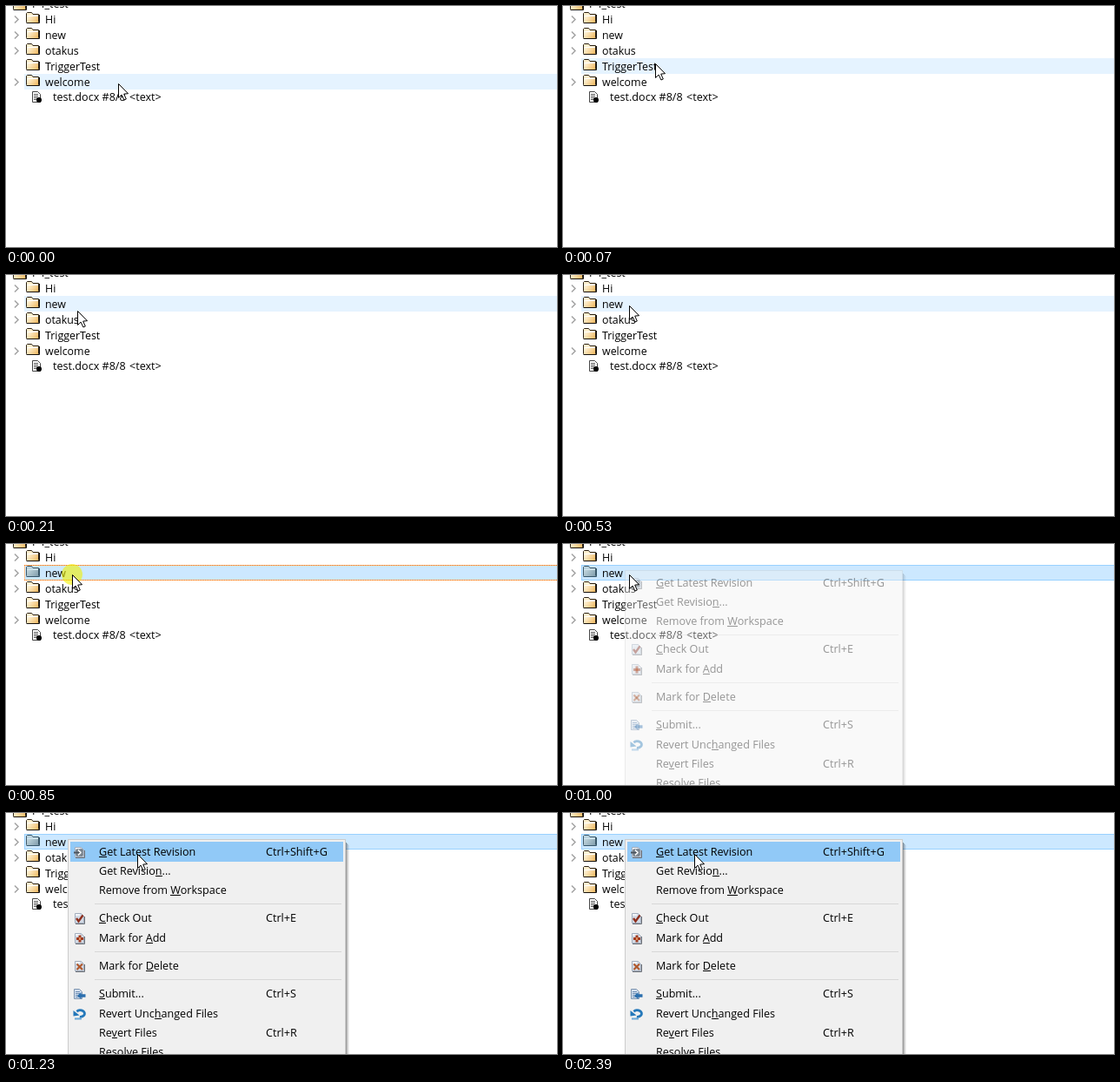
Animation of 634 by 277 pixels, one loop 2.56 s. Source, as an HTML page with a canvas:

```html
<!DOCTYPE html>
<html lang="en">
<head>
<meta charset="utf-8">
<title>Tree context menu</title>
<style>
  html, body { margin: 0; width: 100%; height: 100%; overflow: hidden; background: #fff; }
  canvas { display: block; }
</style>
</head>
<body>
<canvas id="stage" width="634" height="277"></canvas>
<script>
const W = 634, H = 277, LOOP = 2560;
const ctx = document.getElementById('stage').getContext('2d');
const FAMILY = '"Open Sans", "Noto Sans", sans-serif';
const MENU_X = 71, MENU_Y = 30, MENU_W = 320;

// Each pose holds until the next one starts.
const poses = [
  { t: 0, x: 129, y: 89, hover: 4 },
  { t: 70, x: 106, y: 66, hover: 3 },
  { t: 130, x: 87, y: 47, hover: 2 },
  { t: 210, x: 82, y: 41, hover: 1 },
  { t: 380, x: 78, y: 37, hover: 1 },
  { t: 460, x: 76, y: 35, hover: 1 },
  { t: 540, x: 76, y: 35, selected: 1, focus: 1, click: 1 },
  { t: 620, x: 76, y: 35, selected: 1, focus: 1 },
  { t: 850, x: 76, y: 35, selected: 1, focus: 1, click: 1 },
  { t: 1000, x: 76, y: 35, selected: 1, menu: .4 },
  { t: 1080, x: 76, y: 35, selected: 1, menu: .85 },
  { t: 1150, x: 112, y: 41, selected: 1, menu: 1, active: 1 },
  { t: 1230, x: 151, y: 47, selected: 1, menu: 1, active: 1 }
];

const folders = [
  { name: 'Hi', open: 1 }, { name: 'new', open: 1 }, { name: 'otakus', open: 1 },
  { name: 'TriggerTest' }, { name: 'welcome', open: 1 }
];

// "&" marks the underlined access key.
const items = [
  { y: 45, label: '&Get Latest Revision', keys: 'Ctrl+Shift+G', icon: 'get' },
  { y: 67, label: 'Get Revisio&n...' },
  { y: 89, label: 'Remove from &Workspace' },
  { y: 121, label: '&Check Out', keys: 'Ctrl+E', icon: 'check' },
  { y: 144, label: 'Mark for &Add', icon: 'add' },
  { y: 176, label: 'Mark for &Delete', icon: 'remove' },
  { y: 208, label: '&Submit...', keys: 'Ctrl+S', icon: 'submit' },
  { y: 231, label: 'Revert Unc&hanged Files', icon: 'undo' },
  { y: 253, label: 'Re&vert Files', keys: 'Ctrl+R' },
  { y: 275, label: 'R&esolve Files' }
];

function rect(x, y, w, h, color) {
  ctx.fillStyle = color;
  ctx.fillRect(x, y, w, h);
}

function trace(points, close) {
  ctx.beginPath();
  points.forEach(([x, y]) => ctx.lineTo(x, y));
  if (close) ctx.closePath();
}

function line(points, color, width = 1) {
  trace(points);
  ctx.strokeStyle = color;
  ctx.lineWidth = width;
  ctx.stroke();
}

function shape(points, fill, stroke) {
  trace(points, true);
  ctx.fillStyle = fill;
  ctx.fill();
  if (!stroke) return;
  ctx.strokeStyle = stroke;
  ctx.lineWidth = 1;
  ctx.stroke();
}

function disc(x, y, r, color) {
  ctx.beginPath();
  ctx.arc(x, y, r, 0, Math.PI * 2);
  ctx.fillStyle = color;
  ctx.fill();
}

function text(str, x, y, size) {
  ctx.font = `${size}px ${FAMILY}`;
  ctx.fillStyle = '#000';
  ctx.fillText(str, x, y);
}

function at(x, y, draw) {
  ctx.save();
  ctx.translate(x, y);
  draw();
  ctx.restore();
}

function folder(x, y, selected) {
  at(x, y, () => {
    const front = ctx.createLinearGradient(2, 4, 13, 13);
    const tones = selected ? ['#c4d8df', '#829fae'] : ['#fff8e2', '#f0b961'];
    tones.forEach((c, i) => front.addColorStop(i, c));
    const edge = selected ? '#3d5868' : '#2c2113';
    shape([[.5, 11.5], [.5, 1.5], [1.5, .5], [6.5, .5], [8, 2.5], [14.5, 2.5], [14.5, 11.5]],
      selected ? '#bcd4df' : '#fdf0cf', edge);
    rect(1, 5, 13, 7, front);
    line([[1, 4.5], [14, 4.5]], selected ? '#d5e8f0' : '#fff');
    line([[.5, 12.5], [15.5, 12.5], [15.5, 3]], selected ? '#36566a' : '#15110c');
  });
}

function chevron(y) {
  line([[10, y - 4.5], [14, y - .5], [10, y + 3.5]], '#a3a3a3', 1.5);
}

function fileIcon() {
  at(30, 98, () => {
    shape([[.5, .5], [6.5, .5], [9.5, 3.5], [9.5, 12.5], [.5, 12.5]], '#fff', '#444');
    for (let y = 3; y < 11; y += 2) rect(2, y, 5, 1, '#555');
    disc(8, 10, 3, '#000');
  });
}

function tree(p) {
  folder(8, -8);
  text('P4_test', 30, 2, 12.4);
  const marked = p.selected ?? p.hover;
  const top = 24 + (marked - 1) * 18;
  rect(21, top, W - 21, 18, p.selected ? '#cce8ff' : '#e5f3ff');
  if (p.selected) {
    const border = p.focus ? '#ffc08a' : '#99d1ff';
    rect(21, top, 1, 18, border);
    for (const y of [top, top + 17]) {
      rect(21, y, W - 21, 1, border);
      if (p.focus) for (let x = 21; x < W; x += 2) rect(x, y, 1, 1, '#f27a1a');
    }
  }
  folders.forEach((f, i) => {
    const y = 16 + i * 18;
    if (f.open) chevron(y);
    folder(23, y - 9, p.selected === i);
    text(f.name, 45, y + 4, 12.4);
  });
  fileIcon();
  text('test.docx #8/8', 54, 109, 12.6);
  text('<text>', 142, 109, 12.6);
}

function page() {
  shape([[1.5, .5], [8.5, .5], [11.5, 3.5], [11.5, 11.5], [1.5, 11.5]], '#d3dbe6', '#a3aebd');
  rect(2, 1, 5, 2, '#f2f5f9');
  line([[2, 12.5], [12.5, 12.5], [12.5, 4]], '#6d7178');
}

const icons = {
  get() {
    page();
    shape([[3, 3], [10, 3], [10, 10], [3, 10]], '#8b959f', '#59636d');
    line([[0, 6.5], [7, 6.5]], '#4b555f', 2);
    line([[5, 3.5], [8, 6.5], [5, 9.5]], '#fff', 1.4);
  },
  check() {
    page();
    line([[3, 6], [5.5, 9.5], [10.5, 2.5]], '#8e2f1d', 2.4);
  },
  add() {
    page();
    line([[3, 6.5], [11, 6.5]], '#a03c20', 3);
    line([[7, 2.5], [7, 10.5]], '#a03c20', 3);
    rect(6, 5, 2, 3, '#e2905c');
  },
  remove() {
    page();
    line([[3.5, 3.5], [10, 10]], '#b0582c', 2.2);
    line([[10, 3.5], [3.5, 10]], '#b0582c', 2.2);
  },
  submit() {
    shape([[.5, .5], [6.5, .5], [9.5, 3.5], [9.5, 11.5], [.5, 11.5]], '#d3dfee', '#7d94b0');
    for (let y = 3; y < 10; y += 2) rect(2, y, 5, 1, '#6f8fb4');
    shape([[4, 8], [8.5, 4], [8.5, 6.2], [13.5, 6.2], [13.5, 9.8], [8.5, 9.8], [8.5, 12]],
      '#2b6fae');
  },
  undo() {
    ctx.beginPath();
    ctx.ellipse(7.5, 5.5, 5, 3.8, 0, -2.5, 1.7);
    ctx.strokeStyle = '#2478ba';
    ctx.lineWidth = 2.8;
    ctx.stroke();
    shape([[-.5, 2], [-.5, 8.5], [6.5, 7.5]], '#2478ba');
    line([[1, 11.5], [9, 11.5]], '#6aa9d8', 2);
  }
};

function label(str, x, y) {
  const cut = str.indexOf('&');
  const plain = str.replace('&', '');
  text(plain, x, y, 12.6);
  const start = ctx.measureText(plain.slice(0, cut)).width;
  const end = ctx.measureText(plain.slice(0, cut + 1)).width;
  rect(Math.round(x + start), y + 1, Math.round(end - start), 1, '#000');
}

function menu(p) {
  ctx.save();
  ctx.globalAlpha = p.menu;
  [.38, .25, .14, .06].forEach((a, i) =>
    rect(MENU_X + MENU_W + i, MENU_Y + 4 + i, 1, H, `rgba(0,0,0,${a})`));
  rect(MENU_X, MENU_Y, MENU_W, 1, '#ccc');
  for (const x of [MENU_X, MENU_X + MENU_W - 1]) rect(x, MENU_Y + 1, 1, H, '#ccc');
  rect(MENU_X + 1, MENU_Y + 1, MENU_W - 2, H, '#f0f0f0');
  if (p.active) rect(74, 33, 314, 23, '#91c9f7');
  for (const y of [104, 159, 191]) rect(102, y, 284, 1, '#d7d7d7');
  for (const it of items) {
    if (it.icon) at(78, it.y - 6, icons[it.icon]);
    label(it.label, 107, it.y + 4);
    if (it.keys) text(it.keys, 299, it.y + 4, 12.6);
  }
  ctx.restore();
}

function pointer(x, y) {
  at(x + .5, y + .5, () => shape(
    [[0, 0], [0, 16], [3.6, 12.6], [6.4, 18.5], [8.8, 17.5], [6.2, 11.6], [11, 11.2]],
    '#fff', '#000'));
}

function draw(t) {
  const p = poses.findLast(q => q.t <= t);
  rect(0, 0, W, H, '#fff');
  tree(p);
  if (p.menu) menu(p);
  if (p.click) disc(76, 35, 12, 'rgba(240,240,0,.6)');
  pointer(p.x, p.y);
}

const begin = performance.now();
function tick() {
  draw((performance.now() - begin) % LOOP);
  requestAnimationFrame(tick);
}
tick();
</script>
</body>
</html>
```
